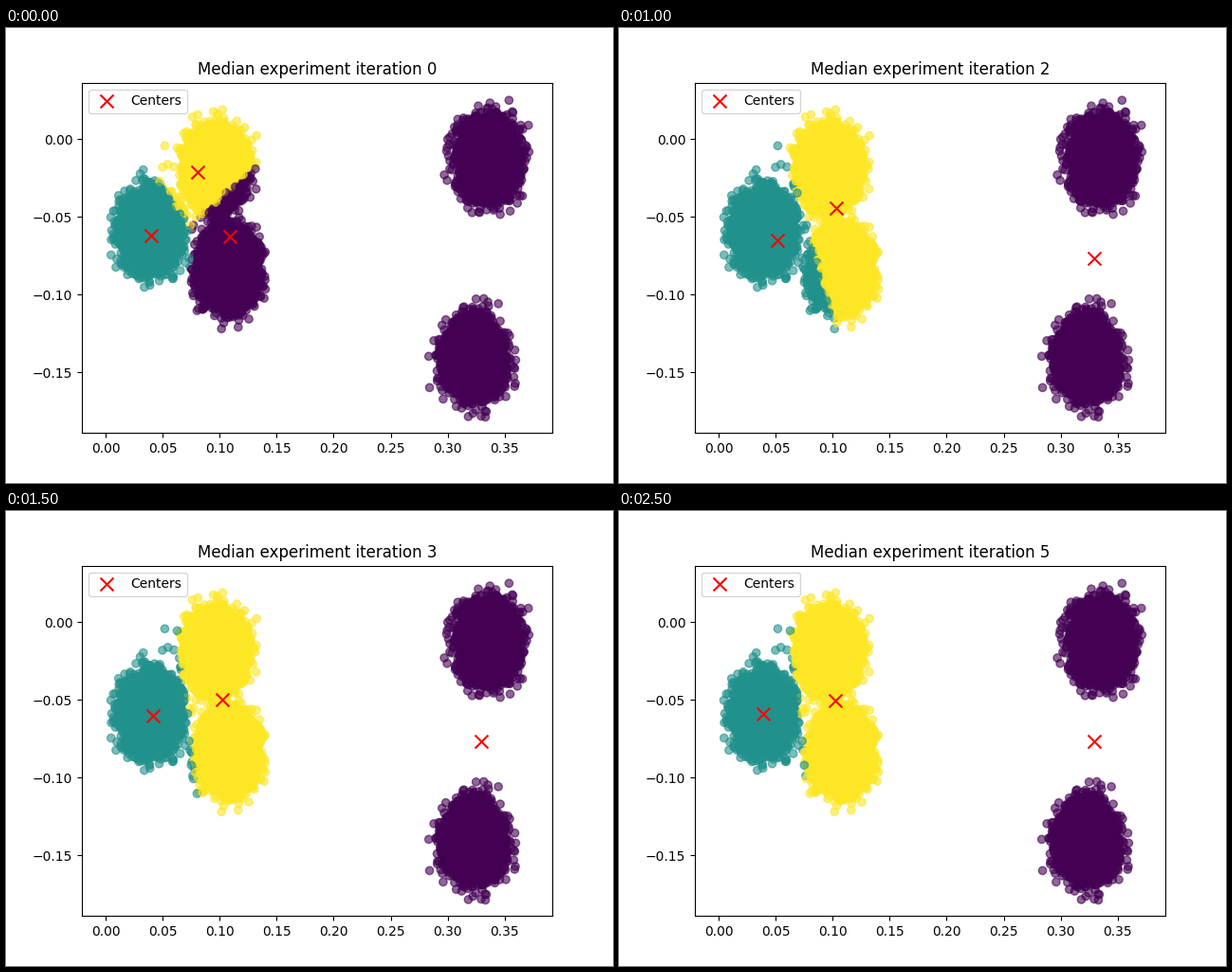
Animation, 640 px wide and 480 px high, one loop 3000 ms. Source, as a matplotlib script:

```python
import numpy as np
import matplotlib.pyplot as plt
from matplotlib.animation import FuncAnimation

STEPS = 6
SIGMA = 0.01
PER_BLOB = 10000
rng = np.random.default_rng(7)


def to_data(pixels):
    """Stage pixels to plot coordinates."""
    x, y = np.transpose(pixels)
    return np.column_stack([(x - 105.2) / 1201.2, (117.4 - y) / 1640])


def nearest(centers):
    gaps = points[:, None, :] - centers[None, :, :]
    return (gaps ** 2).sum(axis=2).argmin(axis=1)


def regroup(centers):
    """Move each center to the middle of the points closest to it."""
    labels = nearest(centers)
    return np.array([points[labels == k].mean(axis=0) for k in range(len(centers))])


blobs = to_data([(152.5, 213.5), (221.5, 147), (234, 253), (508.5, 138.5), (493, 347)])
points = np.vstack([rng.normal(middle, SIGMA, (PER_BLOB, 2)) for middle in blobs])
rng.shuffle(points)

# Purple, teal and yellow starting centers, then one regrouping per step
history = [to_data([(236, 220), (153, 219), (202, 152)])]
while len(history) < STEPS:
    history.append(regroup(history[-1]))

fig, ax = plt.subplots(figsize=(6.4, 4.8), dpi=100)
dots = ax.scatter(*points.T, c=nearest(history[0]), cmap="viridis", vmin=0, vmax=2, alpha=0.6)
crosses = ax.scatter(*history[0].T, marker="x", s=100, c="red", label="Centers")
(left, top), (right, bottom) = to_data([(80, 57.6), (576, 427.2)])
ax.set(xlim=(left, right), ylim=(bottom, top))
ax.legend(loc="upper left")
title = ax.set_title("")


def update(step):
    dots.set_array(nearest(history[step]))
    crosses.set_offsets(history[step])
    title.set_text(f"Median experiment iteration {step}")
    return dots, crosses, title


anim = FuncAnimation(fig, update, frames=STEPS, interval=500, repeat=True)
plt.show()
```
